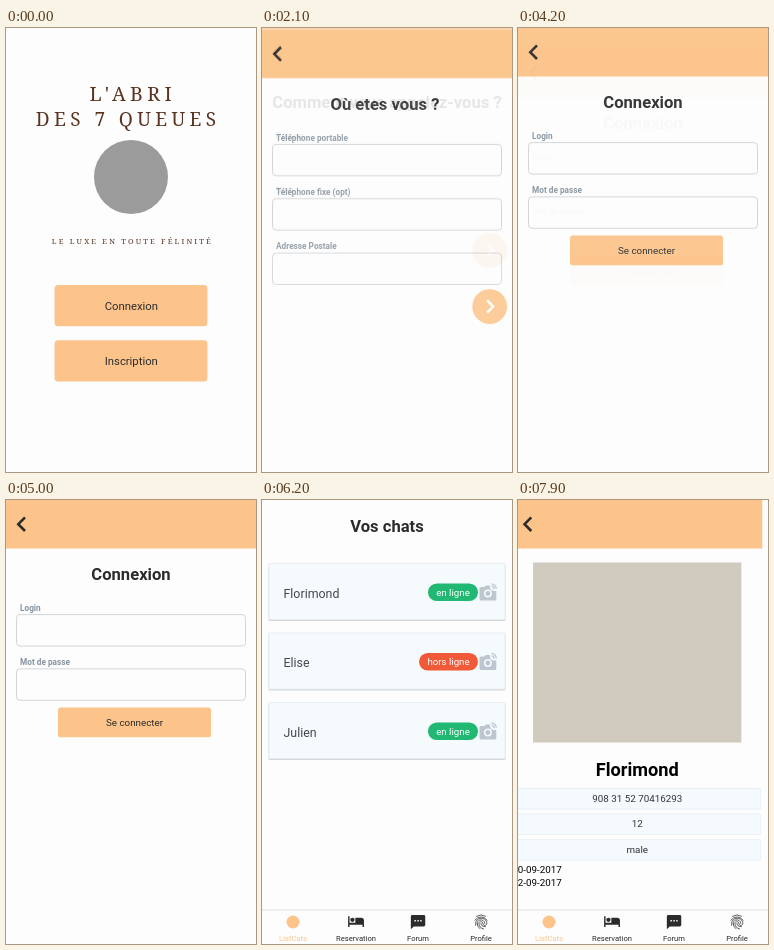
An HTML page that plays this animation: 250x444 px, repeating every 8000 ms.

```html
<!DOCTYPE html>
<html lang="fr">
<head>
<meta charset="utf-8">
<title>Pension pour chats</title>
<style>
  html, body { margin: 0; width: 100%; height: 100%; overflow: hidden; background: #fdfdfd; }
  svg { display: block; width: 100%; height: 100%; font-family: Roboto, sans-serif; }
  .serif { font-family: "Noto Serif", serif; font-weight: 300; fill: #5b3421; }
</style>
</head>
<body>
<svg id="stage" viewBox="0 0 250 444"></svg>
<script>
const ORANGE = '#fcc48b', INK = '#2b2b2b', PAPER = '#fdfdfd';
const STEP = 54.3; // distance between form fields

const rect = (x, y, w, h, fill, more = '') =>
  `<rect x="${x}" y="${y}" width="${w}" height="${h}" fill="${fill}" ${more}/>`;
const text = (s, x, y, size, fill = INK, more = '') =>
  `<text x="${x}" y="${y}" font-size="${size}" fill="${fill}" ${more}>${s}</text>`;
const centered = (s, x, y, size, fill, more = '') =>
  text(s, x, y, size, fill, `text-anchor="middle" ${more}`);
const chevron = (x, y, dx, dy, color, width) =>
  `<path d="M${x} ${y - dy}l${dx} ${dy}l${-dx} ${dy}" fill="none" stroke="${color}" stroke-width="${width}"/>`;
const title = (s, y) => centered(s, 125, y, 16.6, INK, 'font-weight="700"');
const header = () => rect(0, 0, 250, 48.5, ORANGE) + chevron(19, 24.2, -6.7, 6.8, INK, 2.6);
const page = body => rect(0, 0, 250, 444, PAPER) + body;

const field = (label, y) =>
  text(label, 14, y, 8.25, '#86939e', 'font-weight="700"') +
  rect(10.5, y + 3.6, 229, 31.4, PAPER, 'rx="3.5" stroke="#d2d5d8"');

function form(lines, labels, action) {
  const top = 111 + (lines.length - 1) * 19.6;
  const end = top + labels.length * STEP;
  return page(header() +
    lines.map((s, i) => title(s, 80.2 + i * 19.6)).join('') +
    labels.map((s, i) => field(s, top + i * STEP)).join('') +
    action(end));
}

const nextButton = end =>
  `<circle cx="227.7" cy="${end + 2.8}" r="17.4" fill="${ORANGE}"/>` +
  chevron(225.2, end + 2.8, 6, 6.1, '#fff', 2.5);
const loginButton = end =>
  rect(52, end - 12, 153, 29.6, ORANGE, 'rx="2.5"') +
  centered('Se connecter', 128.5, end + 6.4, 9.8);

function home() {
  const serif = (s, x, y, size, gap) =>
    `<text class="serif" x="${x + gap / 2}" y="${y}" font-size="${size}" letter-spacing="${gap}" text-anchor="middle">${s}</text>`;
  const button = (s, y) =>
    rect(48.6, y, 152.8, 41.3, ORANGE, 'rx="3.5"') + centered(s, 125.3, y + 24.8, 11.3);
  return page(
    serif("L'ABRI", 124.5, 72.5, 19.5, 4.4) +
    serif('DES 7 QUEUES', 120, 98, 19, 4.4) +
    '<circle cx="125" cy="149" r="37" fill="#9b9b9b"/>' +
    serif('LE LUXE EN TOUTE FÉLINITÉ', 125.3, 216, 7.6, 2.15) +
    button('Connexion', 257) + button('Inscription', 312.2));
}

const camera = (x, y) => `<g transform="translate(${x} ${y}) scale(.8)" fill="#bdc6cf">
  <path fill-rule="evenodd" d="M2 5h4l2-2h5v3a6 6 0 0 0 6 4h2v10q0 2-2 2H2q-2 0-2-2V7q0-2 2-2z
    M10.5 8a5 5 0 1 0 0 10a5 5 0 1 0 0-10z"/>
  <circle cx="10.5" cy="13" r="3.1"/>
  <path d="M15 4a4 4 0 0 1 3.4 3.6M15 1a7 7 0 0 1 6 6.6" fill="none" stroke="#bdc6cf" stroke-width="1.5"/></g>`;

function card(name, y, online) {
  const x = online ? 166 : 157, w = 216 - x;
  return rect(6.5, y + 1, 237, 56.5, '#d3d8dc', 'rx="1"') +
    rect(7, y, 236, 56, '#f5fafd', 'stroke="#e6ecf0" stroke-width=".8"') +
    text(name, 21.5, y + 34, 12.4, '#43484d') +
    rect(x, y + 20, w, 17.6, online ? '#20b872' : '#f15a38', 'rx="8.8"') +
    centered(online ? 'en ligne' : 'hors ligne', x + w / 2, y + 32.3, 9.7, '#fff') +
    camera(217.5, y + 19.5);
}

function tabBar() {
  const icon = (x, y, d) =>
    `<path transform="translate(${x} ${y}) scale(.72)" fill="${INK}" d="${d}"/>`;
  const label = (s, x, fill) => centered(s, x, 440.8, 7.6, fill);
  return rect(0, 410, 250, 34, PAPER) + rect(0, 409.6, 250, .8, '#d5d5d5') +
    `<circle cx="31" cy="422" r="6.5" fill="${ORANGE}"/>` +
    icon(85.4, 412.6, 'M7 13a3 3 0 1 0 0-6a3 3 0 0 0 0 6zM19 7h-8v7H3V5H1v15h2v-3h18v3h2v-9a4 4 0 0 0-4-4z') +
    icon(147.4, 413.5, 'M20 2H4q-2 0-2 2v18l4-4h14q2 0 2-2V4q0-2-2-2zM9 11H7V9h2zm4 0h-2V9h2zm4 0h-2V9h2z') +
    `<path fill="none" stroke="${INK}" stroke-width=".75" stroke-linecap="round" d="M214.5 416.2q4.5-2.6 9 0
      M212.8 420.2q2.4-3.2 6.2-3.2t6.2 3.2M213.6 425.2c-1.6-8.6 11.2-9.2 11.2-1.8c0 2.6-4 2.6-4 0c0-2.4-3.8-2.2-3.8 0q0 4.4 4.6 5.5
      M215.2 424c-.4-5.6 7.6-5.4 7.6-.6M217.8 428.6q-2.7-2.4-2.6-4.6M219 423.4q0 3.4 4.4 3.2"/>` +
    label('ListCats', 31, ORANGE) + label('Reservation', 94, INK) +
    label('Forum', 156, INK) + label('Profile', 219, INK);
}

function detail() {
  const info = (s, y) =>
    rect(2, y, 246, 20.5, '#f5fafe', 'stroke="#e6eef4" stroke-width=".8"') +
    centered(s, 125, y + 13.4, 9.8, '#2f3336');
  return page(header() +
    rect(20.8, 62.5, 208.3, 180, '#d0cabf') +
    centered('Florimond', 125, 276, 18.2, '#000', 'font-weight="700"') +
    info('908 31 52 70416293', 288.5) + info('12', 314) + info('male', 339.7) +
    text('10-09-2017', 0, 373, 9.8, '#000') + text('12-09-2017', 0, 386.2, 9.8, '#000'));
}

const cats = () => page(
  title('Vos chats', 32) +
  card('Florimond', 63.5, true) + card('Elise', 133, false) + card('Julien', 202.5, true) +
  `<g id="detail">${detail()}</g>` + tabBar());

const login = () => form(['Connexion'], ['Login', 'Mot de passe'], loginButton);

// [start in ms, markup], each scene rising and fading in over the last
const scenes = [
  [-1000, home()],
  [885, form(['Comment vous appelez-vous ?'], ['Prenom', 'Nom'], nextButton)],
  [1900, form(['Où etes vous ?&#160;'],
    ['Téléphone portable', 'Téléphone fixe (opt)', 'Adresse Postale'], nextButton)],
  [2585, form(['Comment vous', 'connectez-vous ?'],
    ['Adresse mail', 'Mot de passe', 'Confirmer votre mot de passe'], nextButton)],
  [3385, login()],
  [4185, login()],
  [5685, cats()]
];
const LOOP = 8000, TICK = 100, DURATION = 500, RISE = 24, DETAIL_START = 7635;

const stage = document.getElementById('stage');
stage.innerHTML = scenes.map(([, body]) => `<g>${body}</g>`).join('');
const layers = [...stage.children];
const detailLayer = document.getElementById('detail');

const progress = (t, start) => {
  const u = Math.min(1, Math.max(0, (t - start) / DURATION));
  return 1 - (1 - u) ** 5;
};

function draw(t) {
  const p = scenes.map(([start]) => progress(t, start));
  layers.forEach((layer, i) => {
    const over = p[i + 1] || 0;
    const shown = p[i] > 0 && over < 1;
    layer.setAttribute('display', shown ? 'inline' : 'none');
    layer.setAttribute('opacity', p[i] ** 2 * (1 - .3 * over));
    layer.setAttribute('transform', `translate(0 ${RISE * (1 - p[i])})`);
  });
  const slide = progress(t, DETAIL_START);
  detailLayer.setAttribute('display', slide > 0 ? 'inline' : 'none');
  detailLayer.setAttribute('transform', `translate(${-250 * (1 - slide)} 0)`);
}

const origin = performance.now();
function frame() {
  const t = (performance.now() - origin) % LOOP;
  draw(Math.floor(t / TICK) * TICK);
  requestAnimationFrame(frame);
}
frame();
</script>
</body>
</html>
```
